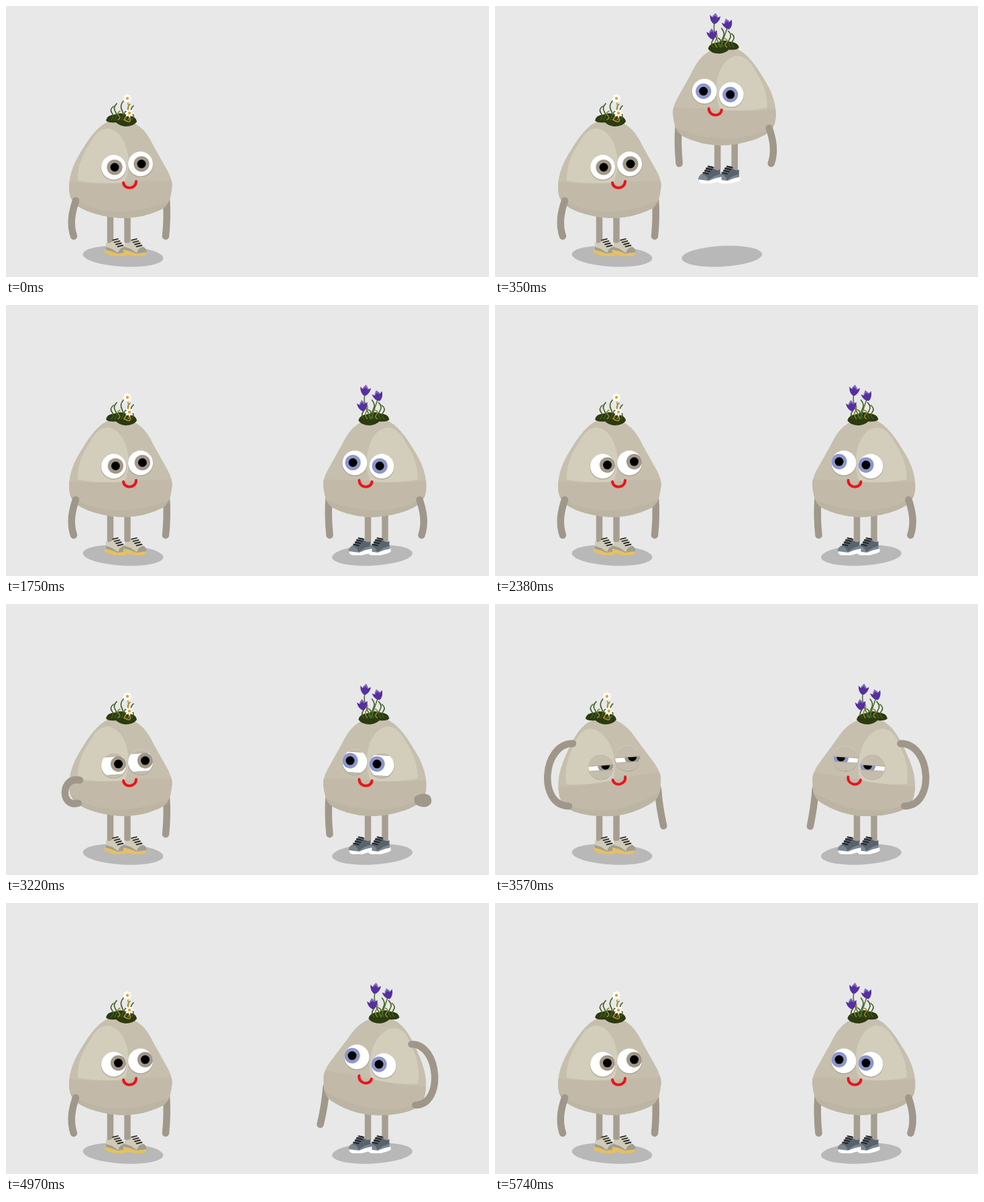
An HTML page that plays this animation: 720x405 px, repeating every 6300 ms.

```html
<!DOCTYPE html>
<html lang="en">
<head>
<meta charset="utf-8">
<title>Two pebbles</title>
<style>
  html, body { margin: 0; width: 100%; height: 100%; overflow: hidden; background: #e8e8e8; }
  svg { display: block; width: 100%; height: 100%; }
</style>
</head>
<body>
<svg id="stage" viewBox="0 0 720 405"></svg>
<script>
const LOOP = 6300, STEP = 70, GAP = 374;
const stage = document.getElementById('stage');

const path = (d, fill) => `<path d="${d}" fill="${fill}"/>`;
const line = (d, color, width) => `<path d="${d}" fill="none" stroke="${color}"
  stroke-width="${width}" stroke-linecap="round" stroke-linejoin="round"/>`;

function daisy(x, y) {
  let petals = '';
  for (let a = 0; a < 360; a += 45)
    petals += `<ellipse cy="-4" rx="1.5" ry="2.7" transform="rotate(${a})"/>`;
  return `<g transform="translate(${x} ${y})" fill="#fff">${petals}<circle r="2.2" fill="#dda52f"/></g>`;
}

const bell = (x, y, turn) => `<g transform="translate(${x} ${y}) rotate(${turn})">` +
  path('M-4 -4L0 -9L4 -4L3 2H-3Z', '#8567c4') +
  path('M0 8Q-7 5 -8 -5L-3 -2L0 -5L4 -2L8 -5Q7 5 0 8Z', '#56309f') + '</g>';

const stem = (x, y, color) => line(`M176 170Q${x + 5} ${y + 18} ${x} ${y + 4}`, color, 1.6);

function grass() {
  let blades = '';
  for (let i = 0; i < 7; i++) {
    const h = 10 + 4 * Math.sin(i * 2.6), x = 157 + i * 5;
    blades += line(`M${x} 170q5 ${-h / 2} 1 ${-h}t2 ${-h}`, i % 3 == 2 ? '#8d8934' : '#405c20', 1.6);
  }
  return blades;
}

const daisies = stem(181, 138, '#b48b32') + stem(184, 160, '#b48b32') + daisy(181, 138) + daisy(184, 160);
const bells = stem(185, 128, '#4d7330') + stem(166, 136, '#4d7330') +
  bell(185, 128, -8) + bell(166, 136, 18) + bell(189, 151, 8);

function shoe(x, c) {
  let laces = '';
  for (let i = 0; i < 4; i++) laces += `M${159 + 2.5 * i} ${350 + 3.2 * i}l8 -2`;
  return `<g transform="translate(${x} 0)">` +
    path('M149 353Q156 357 161 348L170 350Q172 358 178 361Q182 364 181 369Q165 372 149 366Z', c.upper) +
    path('M149 360L158 363L167 369Q169 361 177 360Q183 364 181 370L163 371L149 366Z', c.patch) +
    path('M147 364Q158 366 166 370L181 368Q182 372 176 374L162 374Q150 371 147 369Z', c.sole) +
    line(laces, '#20211f', 1.7) + '</g>';
}

const lid = kind => `<rect class="${kind}" x="-19" width="38" fill="#c4bdad" stroke="#aaa393" stroke-width=".8"/>`;

const eye = iris => `<g class="eye"><circle cy="1" r="19" fill="#9f9788" opacity=".65"/>
  <circle r="18.5" fill="#fff"/><g clip-path="url(#ball)">
  <g class="iris"><circle r="11.6" fill="${iris}"/><circle r="6.5"/></g>
  <g class="lids" transform="rotate(-4)">${lid('upper')}${lid('lower')}</g></g></g>`;

const OUTLINE = 'M148 175C158 168 185 170 196 178C208 186 214 197 221 211L240 245' +
  'C246 256 249 265 247 274C245 290 241 300 229 305C214 312 195 317 174 317' +
  'C148 316 125 309 112 302C98 294 94 284 94 271C94 255 99 240 108 224C120 204 132 184 148 175Z';

const pebble = (id, c) => `<g id="${id}">
  <ellipse cx="174.5" cy="374" rx="60" ry="15.5" fill="#b8b8b8" transform="rotate(3 174.5 374)"/>
  <g class="figure">
    ${line('M155.5 312V352M181 312V352', '#a69e91', 9.5)}
    ${shoe(0, c)}${shoe(28, c)}
    <path class="inner" fill="none" stroke="#a0988a" stroke-width="10.5" stroke-linecap="round"/>
    <g class="body">${path(OUTLINE, '#c6bfae')}
      <g clip-path="url(#rock)">
        ${path('M90 262Q125 268 176 264T252 261V320H90Z', '#c2b9a8')}
        ${path('M92 278Q108 300 150 306T246 290L240 320H92Z', '#bdb5a4')}
      </g>
      ${path('M107 261C106 240 114 222 124 207C132 191 141 183 152 183C168 185 179 202 182 224C184 241 181 256 176 264Q140 267 107 261Z', '#d3cdbb')}
    </g>
    <g class="tuft">
      ${path('M149 171Q150 163 163 162Q171 158 180 163Q194 164 195 173Q190 180 178 180Q169 179 164 174Q152 175 149 171Z', '#2c3a10')}
      ${grass()}${c.flowers}
    </g>
    ${eye(c.iris)}${eye(c.iris)}
    <g class="mouth">${line('M175 264C176 275 194 274 194 262', '#e9151b', 4)}</g>
    <path class="outer" fill="none" stroke="#9f978a" stroke-width="10.5" stroke-linecap="round"/>
  </g></g>`;

stage.innerHTML = `<defs><clipPath id="ball"><circle r="18.5"/></clipPath>
  <clipPath id="rock"><path d="${OUTLINE}"/></clipPath></defs>
  <rect width="720" height="405" fill="#e8e8e8"/>` +
  pebble('right', { iris: '#8d97cc', upper: '#59636e', patch: '#7b8790', sole: '#fff', flowers: bells }) +
  pebble('left', { iris: '#a1988a', upper: '#d0cab9', patch: '#a09e93', sole: '#e5c063', flowers: daisies });

const ramp = (t, from, to) => Math.min(1, Math.max(0, (t - from) / (to - from)));
const ease = (t, from, to) => { const p = ramp(t, from, to); return p * p * (3 - 2 * p); };

// eases up to 1 at `on` and back to 0 at `off`
const held = (t, on, rise, off, fall) => ease(t, on, on + rise) - ease(t, off, off + fall);

function pose(id, t, { start, open, release }) {
  const root = document.getElementById(id);
  const set = (name, attr, value) => root.querySelector('.' + name).setAttribute(attr, value);
  const move = (name, value) => set(name, 'transform', value);

  const lift = held(t, start, 140, release, 280);
  const lean = held(t, start + 70, 420, release, 700);
  const squint = held(t, start, 210, open, 280);
  const gaze = ramp(t, 1680, 1820) ** 2 - ramp(t, 2030, 2170) + ramp(t, 2310, 2380);
  const look = 1.5 + 5.5 * gaze;

  // outer arm: hangs straight at 0, bends round to the head at 1
  const rub = lift === 1 ? Math.sin(Math.PI * (t - 4200) / 385) ** 2 : 0;
  const sx = 104 + 6 * lift, sy = 291 + 11 * lift;
  const hx = 101 + 15 * lift, hy = 344 - 133 * lift - 3 * rub;
  const bend = 6 + 36 * lift + 5 * rub, slack = 18 * (1 - lift);
  set('outer', 'd', `M${sx} ${sy}C${sx - bend} ${sy + slack} ${hx - bend} ${hy - slack} ${hx} ${hy}`);
  set('inner', 'd', `M${239 + 4 * lean} ${288 - 13 * lean}q2 27 ${-1 + 10 * lean} 56`);

  move('body', `translate(${3 * lean} 0) rotate(${-8 * lean} 171 290)`);
  move('tuft', `translate(${-15 * lean} 0)`);
  move('mouth', `translate(${lean} ${-2.5 * lean}) rotate(${-9 * lean} 184 267)`);

  root.querySelectorAll('.eye').forEach((el, n) => {
    const put = (name, attr, value) => el.querySelector('.' + name).setAttribute(attr, value);
    const x = 160.5 + 40 * n - 3 * lean, y = 241 - 5 * n + (2 - 8 * n) * lean;
    el.setAttribute('transform', `translate(${x} ${y})`);
    put('iris', 'transform', `translate(${look} ${(1.5 - look) * .35})`);
    put('lids', 'visibility', squint > 0 ? 'visible' : 'hidden');
    put('upper', 'y', -36.5 + 17 * squint);
    put('upper', 'height', 18);
    put('lower', 'y', 18.5 - 12.5 * squint);
    put('lower', 'height', 18);
  });
}

// the second pebble leaps out from behind the first
function leap(t) {
  const p = ramp(t, 70, 700), right = document.getElementById('right');
  right.style.display = t < 140 ? 'none' : '';
  right.setAttribute('transform', `translate(${720.5 - GAP * (1 - p)} 0) scale(-1 1)`);
  right.querySelector('.figure').setAttribute('transform', `translate(0 ${-440 * p * (1 - p)})`);
}

const begin = performance.now();
function tick() {
  const t = Math.floor((performance.now() - begin) % LOOP / STEP) * STEP;
  pose('left', t, { start: 3140, open: 4270, release: 4270 });
  pose('right', t, { start: 3160, open: 4410, release: 5040 });
  leap(t);
  requestAnimationFrame(tick);
}
tick();
</script>
</body>
</html>
```
